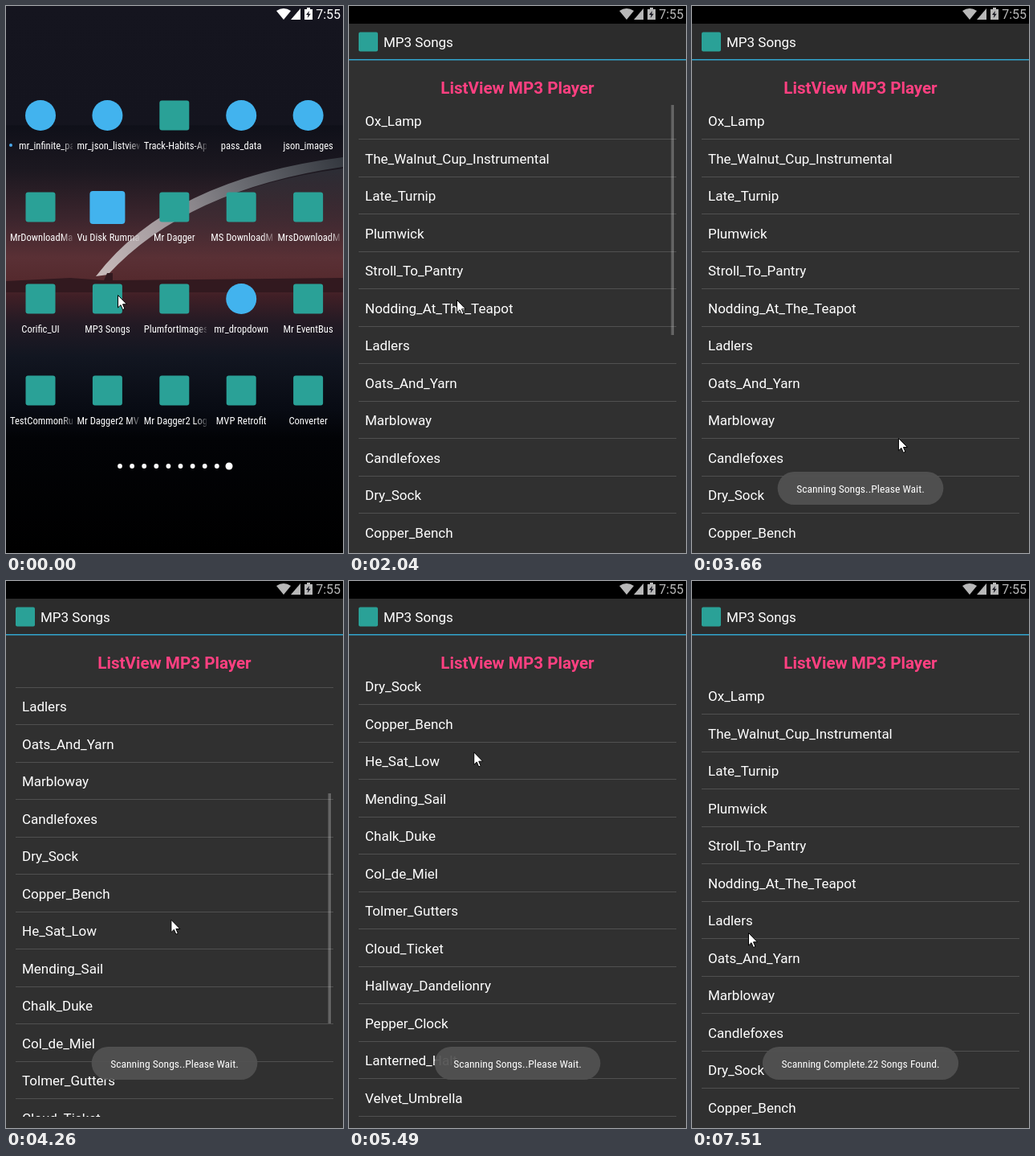
Write an HTML page with a canvas that moves like this. It is 420x680 px and loops after 8 s.

```html
<!DOCTYPE html>
<html lang="en">
<head>
<meta charset="utf-8">
<title>MP3 Songs</title>
<style>
  html, body { margin: 0; height: 100%; overflow: hidden; background: #000; }
  canvas { display: block; }
</style>
</head>
<body>
<canvas id="stage" width="420" height="680"></canvas>
<script>
const ctx = document.getElementById('stage').getContext('2d');
const LOOP = 8000, OPEN = 2040, STEP = 202.4;
const TEAL = '#2aa197', BLUE = '#42b3ee';
const ROW = 46.5, LIST_TOP = 120, LIST_BOTTOM = 666;

const songs = `Ox_Lamp The_Walnut_Cup_Instrumental Late_Turnip Plumwick Stroll_To_Pantry
  Nodding_At_The_Teapot Ladlers Oats_And_Yarn Marbloway Candlefoxes Dry_Sock Copper_Bench
  He_Sat_Low Mending_Sail Chalk_Duke Col_de_Miel Tolmer_Gutters Cloud_Ticket
  Hallway_Dandelionry Pepper_Clock Lanterned_Halt Velvet_Umbrella`.split(/\s+/);

// Prefix: "*" round blue icon, "#" large blue icon, otherwise a teal one.
const apps = ['*mr_infinite_pages', '*mr_json_listview', 'Track-Habits-App', '*pass_data', '*json_images',
  'MrDownloadManager', '#Vu Disk Rummager', 'Mr Dagger', 'MS DownloadManager', 'MrsDownloadManager',
  'Corific_UI', 'MP3 Songs', 'PlumfortImages', '*mr_dropdown', 'Mr EventBus',
  'TestCommonRules', 'Mr Dagger2 MVP', 'Mr Dagger2 Logic', 'MVP Retrofit', 'Converter'];

// Keyframes: [ms, value, ...]
const cursorKeys = [[0, 139, 359], [189, 139, 359], [190, 134, 365], [2300, 134, 365], [2630, 163, 304],
  [3250, 220, 420], [3660, 257, 537], [3860, 246, 637], [4060, 226, 560], [4460, 186, 290],
  [4660, 177, 225], [5290, 160, 210], [5690, 150, 215], [6480, 150, 526], [6900, 128, 560], [7500, 70, 437]];
const scrollKeys = [[3860, 0], [4060, 80], [4460, 440], [4560, 477], [5490, 477], [5890, 340],
  [6280, 150], [6480, 71], [6700, 0]];
const barKeys = [[2240, 1], [2440, .8], [2640, 0], [3860, 0], [4000, 1], [4870, 1], [5290, 0],
  [5490, 0], [5600, 1], [6900, 1], [7300, 0]];
const glowKeys = [[4400, 0], [4660, 1], [5290, 0]];
const scanKeys = [[2040, 0], [2240, .45], [2440, 1], [5600, 1], [5900, 0]];
const doneKeys = [[5900, 0], [6280, 1]];

function at(keys, t) {
  const next = keys.findIndex(k => k[0] > t);
  if (next === 0) return keys[0].slice(1);
  if (next < 0) return keys.at(-1).slice(1);
  const a = keys[next - 1], b = keys[next], p = (t - a[0]) / (b[0] - a[0]);
  return a.slice(1).map((v, i) => v + (b[i + 1] - v) * p);
}

function text(str, x, y, size, { color = '#fff', align = 'left', weight = 400, narrow = false } = {}) {
  ctx.font = `${weight} ${size}px ${narrow ? '"Roboto Condensed", ' : ''}Roboto, sans-serif`;
  ctx.fontStretch = narrow ? 'condensed' : 'normal';
  ctx.textAlign = align;
  ctx.fillStyle = color;
  ctx.fillText(str, x, y);
}

function rect(x, y, w, h, color, r = 0) {
  ctx.fillStyle = color;
  ctx.beginPath();
  ctx.roundRect(x, y, w, h, r);
  ctx.fill();
}

function disc(x, y, r, color) {
  rect(x - r, y - r, 2 * r, 2 * r, color, r);
}

function shape(d, color) {
  ctx.fillStyle = color;
  ctx.fill(new Path2D(d));
}

function linear(x0, y0, x1, y1, stops) {
  const g = ctx.createLinearGradient(x0, y0, x1, y1);
  for (const [p, c] of stops) g.addColorStop(p, c);
  return g;
}

function statusBar(color) {
  shape('M337 6Q346 0 355 6L346 17Z', color);
  shape('M355 17L367 3V17Z', color);
  shape('M375 2h4v2h3v13h-10V4h3Z', color);
  shape('M378 6l-4 5h2.5l-.8 4 4-5.300h-2.500Z', '#15151f');
  text('7:55', 417, 16, 16, { color, align: 'right' });
}

function wallpaper() {
  rect(0, 0, 420, 680, linear(0, 0, 0, 680, [
    [0, '#15151f'], [.217, '#14141e'], [.219, '#0f1019'], [.3, '#1c1820'], [.39, '#3c252d'],
    [.46, '#5a3035'], [.5, '#552a2e'], [.53, '#401f26'], [.58, '#231a24'], [.64, '#121621'],
    [.74, '#080b13'], [.79, '#020306'], [1, '#000']]));
  shape('M125 334Q225 228 420 202V336Z', linear(0, 200, 0, 336, [[0, '#343840aa'], [1, '#5a303500']]));
  shape('M112 336Q205 215 420 188V200Q225 228 127 334Z',
    linear(112, 336, 420, 190, [[0, '#c9bcbc'], [.3, '#a39a9e'], [.6, '#6d6e74'], [1, '#34383f']]));
  shape('M0 342L80 338 122 341 126 332h7v9L240 340 420 338V356H0Z', '#32191f');
}

function home(t) {
  wallpaper();
  statusBar('#fff');
  apps.forEach((app, i) => {
    const x = 43 + i % 5 * 83.4, y = 136 + Math.floor(i / 5) * 114;
    const kind = app[0], name = app.replace(/^[*#]/, '');
    if (i === 11 && t >= 1020 && t < 1420) rect(x - 21, y - 21, 43, 43, '#ffffff66', 5);
    if (kind === '*') disc(x, y, 19, BLUE);
    else if (kind === '#') rect(x - 22, y - 20, 44, 41, BLUE, 4);
    else rect(x - 18.5, y - 18.5, 37, 37, TEAL, 3);
    label(name, x, y + 42, i === 0);
  });
  for (let i = 0; i < 9; i++) disc(142 + i * 15.1, 572, 2.9, '#fff');
  disc(278, 572, 4.500, '#fff');
}

function label(name, x, y, isNew) {
  const left = x - 38, right = x + 40;
  ctx.save();
  ctx.beginPath();
  ctx.rect(left - 2, y - 16, right - left + 2, 24);
  ctx.clip();
  if (isNew) disc(6, y - 5, 2, '#4aa8ea');
  const start = isNew ? 16 : left;
  ctx.font = '400 12.6px "Roboto Condensed", Roboto, sans-serif';
  ctx.fontStretch = 'condensed';
  const long = ctx.measureText(name).width > right - start;
  const color = long ? linear(right - 14, 0, right, 0, [[0, '#fff'], [1, '#fff3']]) : '#fff';
  text(name, long ? start : x, y, 12.6, { color, align: long ? 'left' : 'center', narrow: true });
  ctx.restore();
}

function toast(message, alpha) {
  if (!alpha) return;
  ctx.save();
  ctx.globalAlpha = alpha;
  ctx.font = '400 13.6px "Roboto Condensed", Roboto, sans-serif';
  ctx.fontStretch = 'condensed';
  const w = ctx.measureText(message).width + 47;
  rect(210 - w / 2, 579, w, 41, '#525252ee', 20.5);
  text(message, 210, 605, 13.6, { align: 'center', narrow: true });
  ctx.restore();
}

function list(t) {
  const [scroll] = at(scrollKeys, t), [bar] = at(barKeys, t), [glow] = at(glowKeys, t);
  ctx.save();
  ctx.beginPath();
  ctx.rect(12, LIST_TOP, 396, LIST_BOTTOM - LIST_TOP);
  ctx.clip();
  songs.forEach((song, i) => {
    const y = LIST_TOP + i * ROW - scroll;
    text(song, 20, y + 29, 17);
    rect(12, Math.round(y + 45), 396, 1, '#505050');
  });
  rect(401.5, 123 + scroll * 253 / 477, 3.5, 286, `rgba(255,255,255,${bar * .25})`);
  if (glow) {
    ctx.translate(210, LIST_BOTTOM);
    ctx.scale(1, 28 / 195);
    const g = ctx.createRadialGradient(0, 0, 0, 0, 0, 195);
    g.addColorStop(0, `rgba(255,255,255,${glow * .6})`);
    g.addColorStop(.6, `rgba(255,255,255,${glow * .42})`);
    g.addColorStop(1, `rgba(255,255,255,${glow * .12})`);
    disc(0, 0, 195, g);
  }
  ctx.restore();
}

function player(t) {
  rect(0, 0, 420, 680, '#303030');
  rect(0, 0, 420, 22, '#000');
  statusBar('#b8b8b8');
  rect(0, 22, 420, 44, '#2c2c2c');
  rect(0, 66, 420, 1.5, '#32a5cf');
  rect(12, 32.5, 24, 24, TEAL, 2);
  text('MP3 Songs', 43, 51, 17);
  text('ListView MP3 Player', 210, 109, 20.6, { color: '#ff4081', align: 'center', weight: 700 });
  list(t);
  toast('Scanning Songs..Please Wait.', at(scanKeys, t)[0]);
  toast('Scanning Complete.22 Songs Found.', at(doneKeys, t)[0]);
}

function cursor(x, y) {
  ctx.save();
  ctx.translate(x, y);
  const arrow = new Path2D('M.5 .5V16L4 12.700 6.500 18.500 9 17.500 6.500 11.800H11.500Z');
  ctx.fillStyle = '#fff';
  ctx.strokeStyle = '#000';
  ctx.fill(arrow);
  ctx.stroke(arrow);
  ctx.restore();
}

function sampled(t) {
  return t < OPEN ? t : OPEN + Math.floor((t - OPEN + 12) / STEP) * STEP;
}

function frame() {
  const t = sampled(performance.now() % LOOP);
  ctx.clearRect(0, 0, 420, 680);
  (t < OPEN ? home : player)(t);
  cursor(...at(cursorKeys, t));
  requestAnimationFrame(frame);
}
frame();
</script>
</body>
</html>
```
